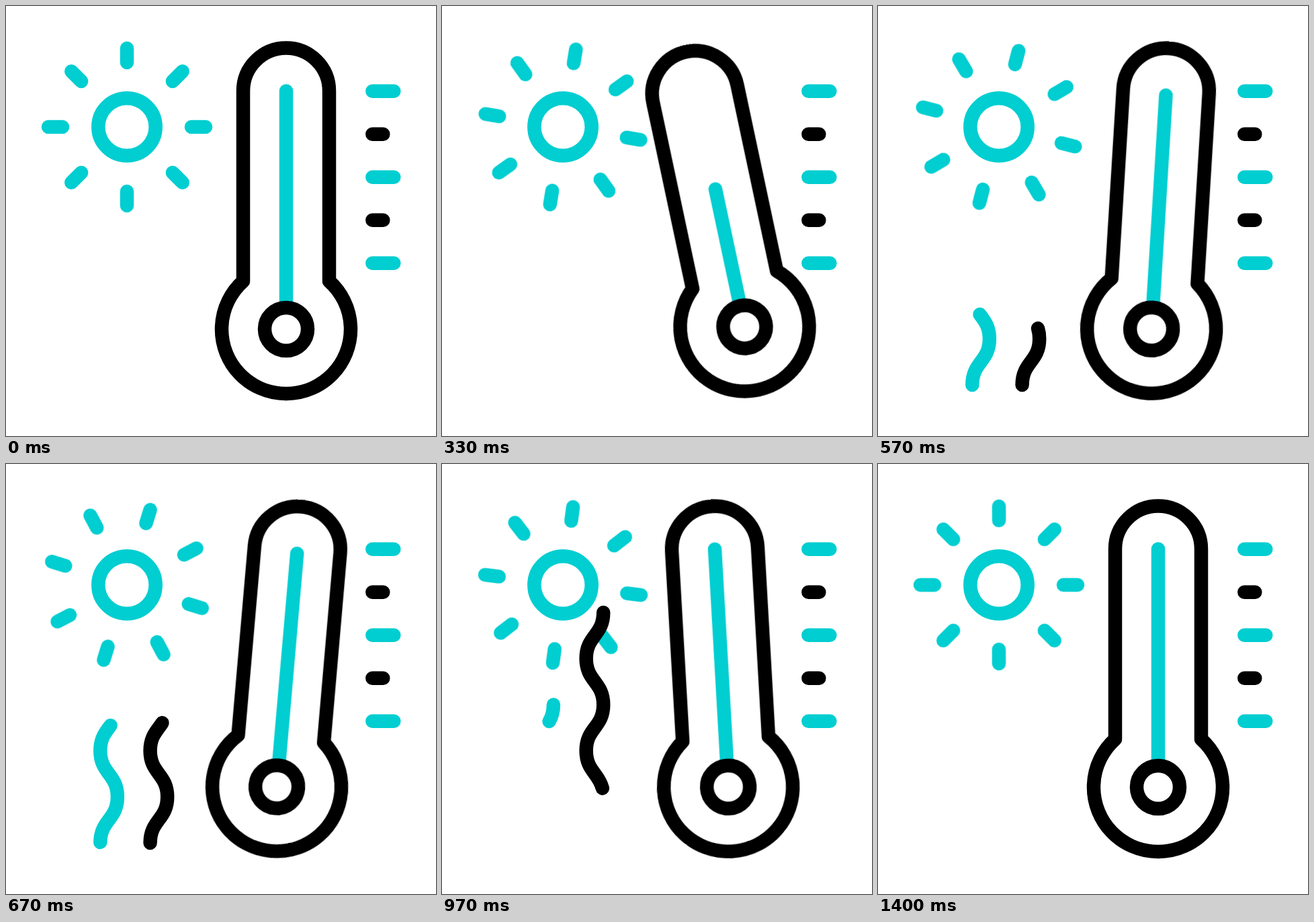
Recreate the animation shown at these times as an HTML page without scripts. Size 640 by 640 pixels, loop 1670 ms.

```html
<!DOCTYPE html>
<html lang="en">
<head>
<meta charset="utf-8">
<title>Hot weather</title>
<style>
  @property --tip { syntax: "<length>"; inherits: false; initial-value: 0px; }
  @property --tail { syntax: "<length>"; inherits: false; initial-value: 0px; }

  html, body { margin: 0; width: 100%; height: 100%; overflow: hidden; background: #fff; }

  svg {
    display: block; width: 100%; height: 100%;
    fill: none; stroke: #000; stroke-width: 20.5;
    stroke-linecap: round; stroke-linejoin: round;
    --loop: 1670ms infinite;
    --smooth: cubic-bezier(.333, 0, .667, 1);
  }
  .cyan { stroke: #00ced1; }

  /* One turn and an eighth, speeding up and slowing down without a break. */
  .rays { animation: spin var(--loop); }
  @keyframes spin {
    0% { transform: rotate(0deg); animation-timing-function: cubic-bezier(.333, 0, .667, .373); }
    19.76% { transform: rotate(54.2deg); animation-timing-function: cubic-bezier(.333, .251, .667, .638); }
    34.13% { transform: rotate(149deg); animation-timing-function: cubic-bezier(.333, .309, .667, .697); }
    46.11% { transform: rotate(244deg); animation-timing-function: cubic-bezier(.333, .37, .667, .696); }
    58.08% { transform: rotate(322deg); animation-timing-function: cubic-bezier(.333, .362, .667, .754); }
    67.66% { transform: rotate(376.6deg); animation-timing-function: cubic-bezier(.333, .758, .667, 1); }
    83.83%, 100% { transform: rotate(405deg); }
  }

  .thermometer { transform-origin: 417px 320px; animation: swing var(--loop) var(--smooth); }
  @keyframes swing {
    0%, 66.9%, 100% { transform: rotate(0deg); }
    19.8% { transform: rotate(-12deg); }
    37.9% { transform: rotate(5.4deg); }
    55.1% { transform: rotate(-3.9deg); }
  }

  .liquid { stroke-dasharray: 318.5px 400px; animation: level var(--loop) var(--smooth); }
  @keyframes level {
    0%, 57%, 100% { stroke-dasharray: 318.5px 400px; }
    19.8% { stroke-dasharray: 173.5px 400px; }
    34.1%, 46.1% { stroke-dasharray: 312.5px 400px; }
  }

  /* Each wave shows the stretch of its path between tail and tip. */
  .wave {
    opacity: 0;
    stroke-dasharray: calc(var(--tip) - var(--tail)) 999px;
    stroke-dashoffset: calc(-1 * var(--tail));
  }
  .wave.near { animation: near-tip var(--loop) var(--smooth), near-tail var(--loop) var(--smooth), near-show var(--loop) step-end; }
  .wave.far { animation: far-tip var(--loop) var(--smooth), far-tail var(--loop) var(--smooth), far-show var(--loop) step-end; }
  @keyframes near-tip { 0%, 22% { --tip: 0px; } 46%, 100% { --tip: 206px; } }
  @keyframes near-tail { 0%, 39.3% { --tail: 0px; } 63.2%, 100% { --tail: 206px; } }
  @keyframes near-show { 0% { opacity: 0; } 22% { opacity: 1; } 63.2%, 100% { opacity: 0; } }
  @keyframes far-tip { 0%, 24.4% { --tip: 0px; } 55%, 100% { --tip: 343px; } }
  @keyframes far-tail { 0%, 47.4% { --tail: 0px; } 81.6%, 100% { --tail: 343px; } }
  @keyframes far-show { 0% { opacity: 0; } 24.4% { opacity: 1; } 81.6%, 100% { opacity: 0; } }
</style>
</head>
<body>
<svg viewBox="0 0 640 640">
  <defs>
    <path id="pair" d="M0-117v21M0 96v21"/>
  </defs>

  <g class="cyan" transform="translate(180 180)">
    <circle r="42.7"/>
    <g class="rays">
      <use href="#pair"/>
      <use href="#pair" transform="rotate(45)"/>
      <use href="#pair" transform="rotate(90)"/>
      <use href="#pair" transform="rotate(135)"/>
    </g>
  </g>

  <path class="cyan" d="M545.3 126.8h32M545.3 254.8h32M545.3 382.8h32"/>
  <path d="M545.3 190.8h16M545.3 318.8h16"/>

  <path class="wave near cyan" pathLength="206"
        d="M140.3 564c0-34.3 25.6-34.3 25.6-68.6s-25.6-34.3-25.6-68.6 25.6-34.3 25.6-68.6"/>
  <path class="wave far" pathLength="343"
        d="M214.6 564c0-34.3 25.6-34.3 25.6-68.6s-25.6-34.3-25.6-68.6 25.6-34.3 25.6-68.6-25.6-34.3-25.6-68.6 25.6-34.3 25.6-68.6"/>

  <g class="thermometer">
    <path class="liquid cyan" d="M417 445V126.5"/>
    <path d="M353 409.5V126.5a64 64 0 0 1 128 0V409.5A96 96 0 1 1 353 409.5Z"/>
    <circle cx="417" cy="481" r="32"/>
  </g>
</svg>
</body>
</html>
```
